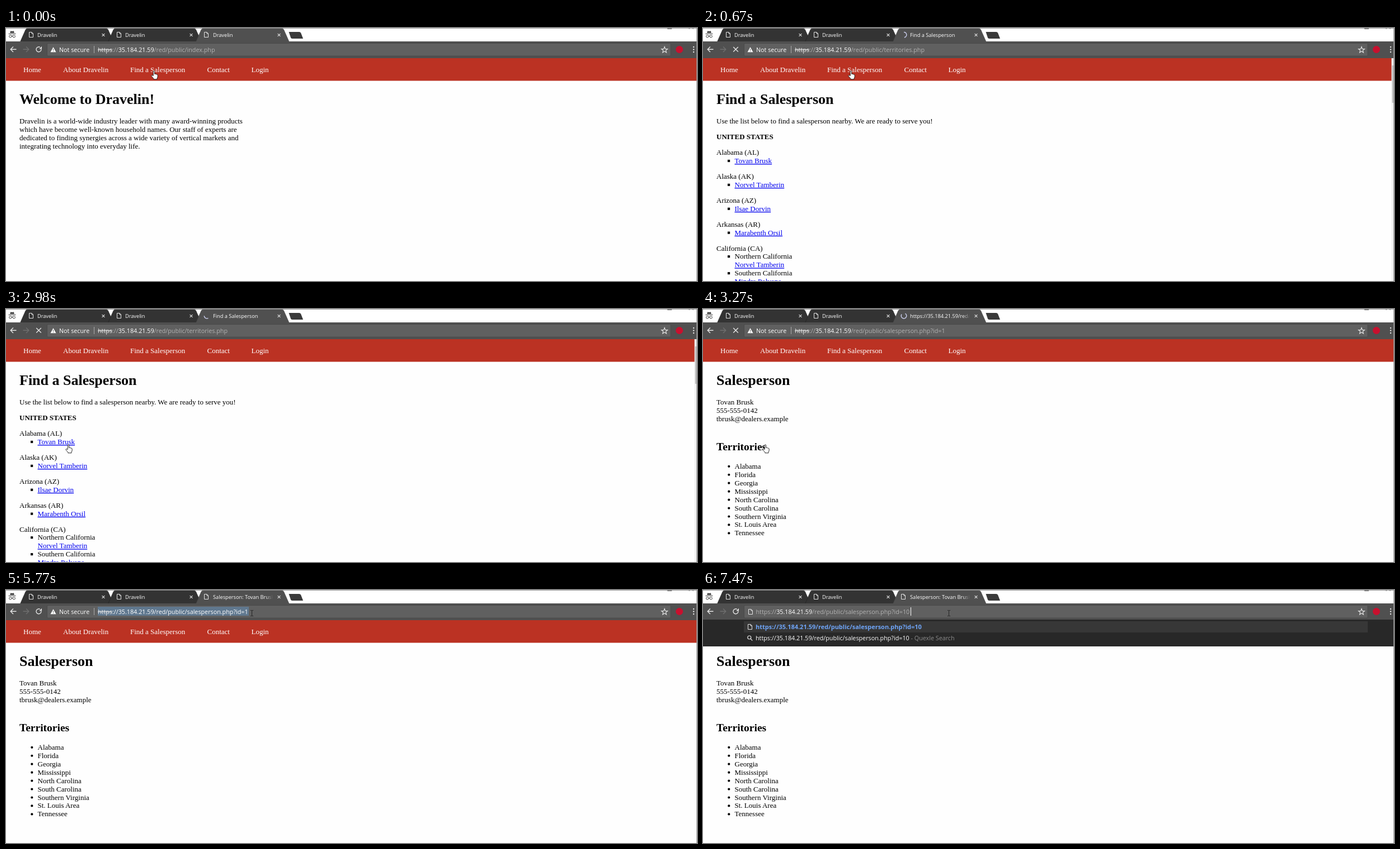
Write an HTML page that moves like this. It is 1235 px wide and 453 px high and loops after 8000 ms.

```html
<!DOCTYPE html>
<html lang="en">
<head>
<meta charset="utf-8">
<title>Browser session</title>
<style>
  html, body { margin: 0; width: 100%; height: 100%; overflow: hidden; background: #fff; }
  svg { display: block; }
  text { white-space: pre; }
  .page { font: 13px "Liberation Serif", serif; fill: #000; }
  .page .h1 { font-size: 26px; font-weight: bold; }
  .page .h2 { font-size: 19.5px; font-weight: bold; }
  .page .bold { font-weight: bold; }
  .page .link { fill: #00e; text-decoration: underline; }
  .page .nav { fill: #fff; }
  .tab { font: 9.2px "Open Sans", sans-serif; fill: #fff; }
  .url { font: 10.75px "Open Sans", sans-serif; fill: #fff; }
  .dim { fill: #b2b2b2; }
  .strike { fill: #e8e8e8; text-decoration: line-through; }
  .line { fill: none; stroke: #e4e4e4; }
</style>
</head>
<body>
<svg id="stage" width="1235" height="453" viewBox="0 0 1235 453"></svg>
<script>
const LOOP = 8000;
const BRAND = 'Dravelin', PERSON = 'Tovan Brusk';
const HOST = '35.184.21.59', ROOT = '/red/public/';
const LINE = 14.95;

// Each step changes part of the state; spin is [start angle, arc length] in degrees.
const steps = [
  [0, { page: 'home', title: BRAND, file: 'index.php', spin: null, cursor: ['hand', 264.5, 77.5], caret: 0, selected: 0, typed: 0 }],
  [150, { spin: [200, 120] }],
  [410, { spin: [110, 120], title: 'https://' + HOST + ROOT, file: 'territories.php' }],
  [540, { spin: [330, 80], page: 'list' }],
  [670, { spin: [0, 170], title: 'Find a Salesperson' }],
  [820, { spin: [60, 260] }],
  [1050, { spin: [170, 200] }],
  [1180, { spin: null }],
  [1300, { cursor: ['arrow', 205, 138] }],
  [1420, { cursor: ['arrow', 140, 198] }],
  [1570, { cursor: ['arrow', 122, 216] }],
  [1690, { cursor: ['arrow', 113, 227] }],
  [1840, { cursor: ['hand', 111.5, 243] }],
  [1990, { cursor: ['hand', 111.5, 243.5] }],
  [2860, { spin: [200, 120] }],
  [2980, { spin: [150, 120] }],
  [3130, { spin: [100, 120], title: 'https://' + HOST + ROOT, file: 'salesperson.php?id=1' }],
  [3270, { spin: [30, 275], page: 'person' }],
  [3410, { spin: [120, 220], title: 'Salesperson: ' + PERSON }],
  [3630, { spin: null, cursor: ['arrow', 121, 245] }],
  [3770, { cursor: ['arrow', 288, 226] }],
  [3920, { cursor: ['arrow', 324, 214] }],
  [4350, { cursor: ['arrow', 398, 104] }],
  [4480, { cursor: ['beam', 431.5, 44.5] }],
  [4630, { cursor: ['beam', 439.5, 41.5] }],
  [5490, { caret: 1 }],
  [5770, { caret: 0, selected: 1 }],
  [6170, { caret: 1, selected: 0 }],
  [6730, { caret: 0 }],
  [7160, { caret: 1 }],
  [7470, { typed: 1 }]
];

const rect = (x, y, w, h, fill, more = '') => `<rect x="${x}" y="${y}" width="${w}" height="${h}" fill="${fill}" ${more}/>`;
const path = (d, more = 'class="line"') => `<path d="${d}" ${more}/>`;
const circle = (x, y, r, more) => `<circle cx="${x}" cy="${y}" r="${r}" ${more}/>`;
const text = (x, y, s, cls = '') => `<text x="${x}" y="${y}" class="${cls}">${s}</text>`;
const span = (s, cls) => `<tspan class="${cls}">${s}</tspan>`;
const lines = (x, y, list) => list.map((s, i) => text(x, y + i * LINE, s)).join('');

const fileIcon = (x, y) => path(`M${x + .5} ${y + .5}h4.5l2.5 2.5v6.5h-7zM${x + 5} ${y + .5}v2.5h2.5`);
const cross = (x, y, r, more) => path(`M${x - r} ${y - r}l${2 * r} ${2 * r}m0 ${-2 * r}l${-2 * r} ${2 * r}`, `class="line" ${more}`);

function arc(x, y, r, [start, length], more) {
  const at = a => {
    const rad = (a - 90) * Math.PI / 180;
    return `${(x + r * Math.cos(rad)).toFixed(2)} ${(y + r * Math.sin(rad)).toFixed(2)}`;
  };
  return path(`M${at(start)}A${r} ${r} 0 ${+(length > 180)} 1 ${at(start + length)}`, more);
}

function tab(x, fill, edge) {
  return path(`M${x - 2.5} 24.5L${x + 7} 3Q${x + 8} 1 ${x + 10.5} 1H${x + 151}Q${x + 153.5} 1 ${x + 154.5} 3L${x + 164} 24.5z`,
    `fill="${fill}" stroke="${edge}" stroke-width=".6"`) + cross(x + 146, 12.5, 2.4, 'stroke-width="1.1"');
}

function tabStrip({ title, spin }) {
  const label = (x, s) => text(x, 15.6, s, 'tab');
  const icon = spin
    ? arc(359, 12.2, 4.8, spin, 'fill="none" stroke="#c6cae8" stroke-width="1.5"')
    : fileIcon(354, 7);
  return rect(0, 0, 1235, 24, '#fff')
    + path('M7 9L8.2 5.2Q11 6.3 13.8 5.2L15 9z', 'fill="#444"')
    + path('M4.5 10.5h13M10 14.3h2', 'stroke="#444" stroke-width="1.2"')
    + circle(7.8, 14.9, 2.2, 'fill="none" stroke="#444"') + circle(14.2, 14.9, 2.2, 'fill="none" stroke="#444"')
    + tab(28, '#333', '#222') + fileIcon(41, 7) + label(56, BRAND)
    + tab(185, '#333', '#222') + fileIcon(198, 7) + label(213, BRAND)
    + tab(342, '#505050', '#444') + icon
    + `<svg x="370" y="0" width="107" height="24">${text(0, 15.6, title, 'tab')}${rect(94, 3, 13, 20, 'url(#fade)')}</svg>`
    + path('M505.5 7H524Q526 7 527 8.7L531 19H512Q510 19 509 17.5z', 'fill="#3a3a3a"')
    + path('M1182 1.5h8M1220.5 2l2-2m4 0l2 2', 'stroke="#555" fill="none"')
    + rect(0, 0, 1235, .8, '#888');
}

function address({ file, typed, selected, caret }) {
  const tail = ROOT + file + (typed ? '0' : '');
  if (typed) {
    return fileIcon(81, 34) + text(94.5, 42.8, span('https://', 'dim') + HOST + span(tail, 'dim'), 'url')
      + rect(371, 31, 1, 15, '#fff');
  }
  const tone = selected ? '' : 'dim';
  return path('M84.5 34.3L89.5 43.3H79.5z', 'fill="#fff"') + path('M84.5 37.3v2.7m0 .9v1.2', 'stroke="#606060"')
    + text(95, 42.8, 'Not secure', 'url') + rect(157, 32, 1, 13, '#aaa')
    + (selected ? rect(164, 30, 270, 16, 'rgba(96,168,235,.33)') : '')
    + text(164, 42.8, span('https', 'strike') + span('://', tone) + HOST + span(tail, tone), 'url')
    + (caret ? rect(433, 30, 1, 16, '#fff') : '');
}

function toolbar(state) {
  const star = Array.from({ length: 10 }, (_, i) => {
    const r = i % 2 ? 2.4 : 5.8, a = i * Math.PI / 5;
    return `${(1177 + r * Math.sin(a)).toFixed(1)} ${(39.3 - r * Math.cos(a)).toFixed(1)}`;
  }).join('L');
  const reload = state.spin
    ? cross(58.5, 38.3, 4.3, 'stroke-width="1.4"')
    : arc(58.5, 38.3, 4.5, [85, 305], 'class="line" stroke-width="1.4"') + path('M64 32.8v4.8h-4.8z', 'fill="#e4e4e4"');
  return rect(0, 24, 1235, 30, '#505050')
    + rect(73.5, 27.5, 1114.5, 22.5, '#606060', 'rx="1.5" stroke="#464646" stroke-width=".7"')
    + path('M18.5 38.3H8.5M13 33.5L8.2 38.3 13 43.1', 'class="line" stroke-width="1.4"')
    + path('M30.5 38.3h10M36 33.5l4.8 4.8-4.8 4.8', 'fill="none" stroke="#6e6e6e" stroke-width="1.4"')
    + reload + address(state)
    + path(`M${star}z`, 'class="line" stroke-width="1.1"')
    + circle(1203.5, 38.5, 6.5, 'fill="#c8102e"')
    + [34, 38.5, 43].map(y => circle(1229, y, 1.2, 'fill="#e4e4e4"')).join('');
}

const pages = {
  home: () => text(24, 136, `Welcome to ${BRAND}!`, 'h1') + lines(24, 171.3, [
    `${BRAND} is a world-wide industry leader with many award-winning products`,
    'which have become well-known household names. Our staff of experts are',
    'dedicated to finding synergies across a wide variety of vertical markets and',
    'integrating technology into everyday life.']),

  list() {
    const square = y => rect(44, y - 6.3, 4.2, 4.2, '#000');
    const states = [['Alabama (AL)', PERSON], ['Alaska (AK)', 'Norvel Tamberin'],
      ['Arizona (AZ)', 'Ilsae Dorvin'], ['Arkansas (AR)', 'Marabenth Orsil']];
    return text(24, 136, 'Find a Salesperson', 'h1')
      + text(24, 171.3, 'Use the list below to find a salesperson nearby. We are ready to serve you!')
      + text(24, 199.2, 'UNITED STATES', 'bold')
      + states.map(([name, seller], i) => {
        const y = 227.2 + i * 42.9;
        return text(24, y, name) + square(y + LINE) + text(56.5, y + LINE, seller, 'link');
      }).join('')
      + text(24, 398.5, 'California (CA)')
      + square(413.4) + text(56.5, 413.4, 'Northern California') + text(56.5, 428.4, 'Norvel Tamberin', 'link')
      + square(443.3) + text(56.5, 443.3, 'Southern California') + text(56.5, 458.3, 'Mindra Polvane', 'link')
      + rect(1230.5, 54, 4.5, 399, '#f1f1f1') + rect(1231.5, 67, 3.5, 67, '#c1c1c1');
  },

  person() {
    const areas = ['Alabama', 'Florida', 'Georgia', 'Mississippi', 'North Carolina',
      'South Carolina', 'Southern Virginia', 'St. Louis Area', 'Tennessee'];
    return text(24, 136, 'Salesperson', 'h1')
      + lines(24, 171.3, [PERSON, '555-555-0142', 'tbrusk@dealers.example'])
      + text(24, 253, 'Territories', 'h2') + lines(56.5, 285.8, areas)
      + areas.map((_, i) => circle(46.3, 281.8 + i * LINE, 2.1, '')).join('');
  }
};

function content({ page }) {
  const links = [[31, 'Home'], [102, 'About ' + BRAND], [222, 'Find a Salesperson'], [359.5, 'Contact'], [438.5, 'Login']];
  return `<g class="page">${rect(0, 53.5, 1235, 41, '#bb3223')}`
    + links.map(([x, s]) => text(x, 79.2, s, 'nav')).join('') + pages[page]() + '</g>';
}

function suggestions() {
  const query = `https://${HOST}${ROOT}salesperson.php?id=10`;
  return rect(0, 53, 1235, 48, '#282828') + rect(73, 56, 1115, 20, '#373737') + fileIcon(80, 61)
    + `<text x="94" y="69.8" class="url" style="font-size:11px;font-weight:700;fill:#6fa5f8">${query}</text>`
    + circle(82.8, 85, 3, 'class="line" stroke-width="1.2"') + path('M85 87.3l3.3 3.3', 'class="line" stroke-width="1.3"')
    + text(94, 90, query + '<tspan fill="#8c8c8c"> - Quexle Search</tspan>', 'url');
}

const cursors = {
  hand: path('M-1.3 8V.6A1.2 1.2 0 0 1 1.1 .6V5C1.8 4.3 3 4.5 3.2 5.4 4 4.8 5 5.1 5.1 6 5.9 5.6 6.6 6 6.6 7V10.2L5.5 12.8V14.3H-.7V13L-4.3 8.9C-5.2 7.4-3.7 6.6-2.7 7.3z',
    'fill="#fff" stroke="#111" stroke-width=".9"'),
  arrow: path('M0 0V11L2.5 8.7 4.2 12.5 5.8 11.8 4.2 8.1H7.7z', 'fill="#fff" stroke="#000" stroke-width=".7"'),
  beam: path('M-2.5 -5H-.7L0 -4.4 .7 -5H2.5M0 -4.4V4.4M-2.5 5H-.7L0 4.4 .7 5H2.5', 'fill="none" stroke="#1c1c1c" stroke-width=".9"')
};

function draw(state) {
  const [shape, x, y] = state.cursor;
  return '<defs><linearGradient id="fade"><stop stop-color="#505050" stop-opacity="0"/><stop offset="1" stop-color="#505050"/></linearGradient></defs>'
    + rect(0, 0, 1235, 453, '#fefefe') + content(state) + tabStrip(state) + toolbar(state)
    + (state.typed ? suggestions() : '')
    + rect(1234, 0, 1, 453, '#a0a0a0')
    + `<g transform="translate(${x} ${y})">${cursors[shape]}</g>`;
}

const stage = document.getElementById('stage');
const start = performance.now();
let shown = 0;

function frame() {
  const now = (performance.now() - start) % LOOP;
  const count = steps.filter(([time]) => time <= now).length;
  if (count !== shown) {
    shown = count;
    stage.innerHTML = draw(Object.assign({}, ...steps.slice(0, count).map(step => step[1])));
  }
  requestAnimationFrame(frame);
}
frame();
</script>
</body>
</html>
```
